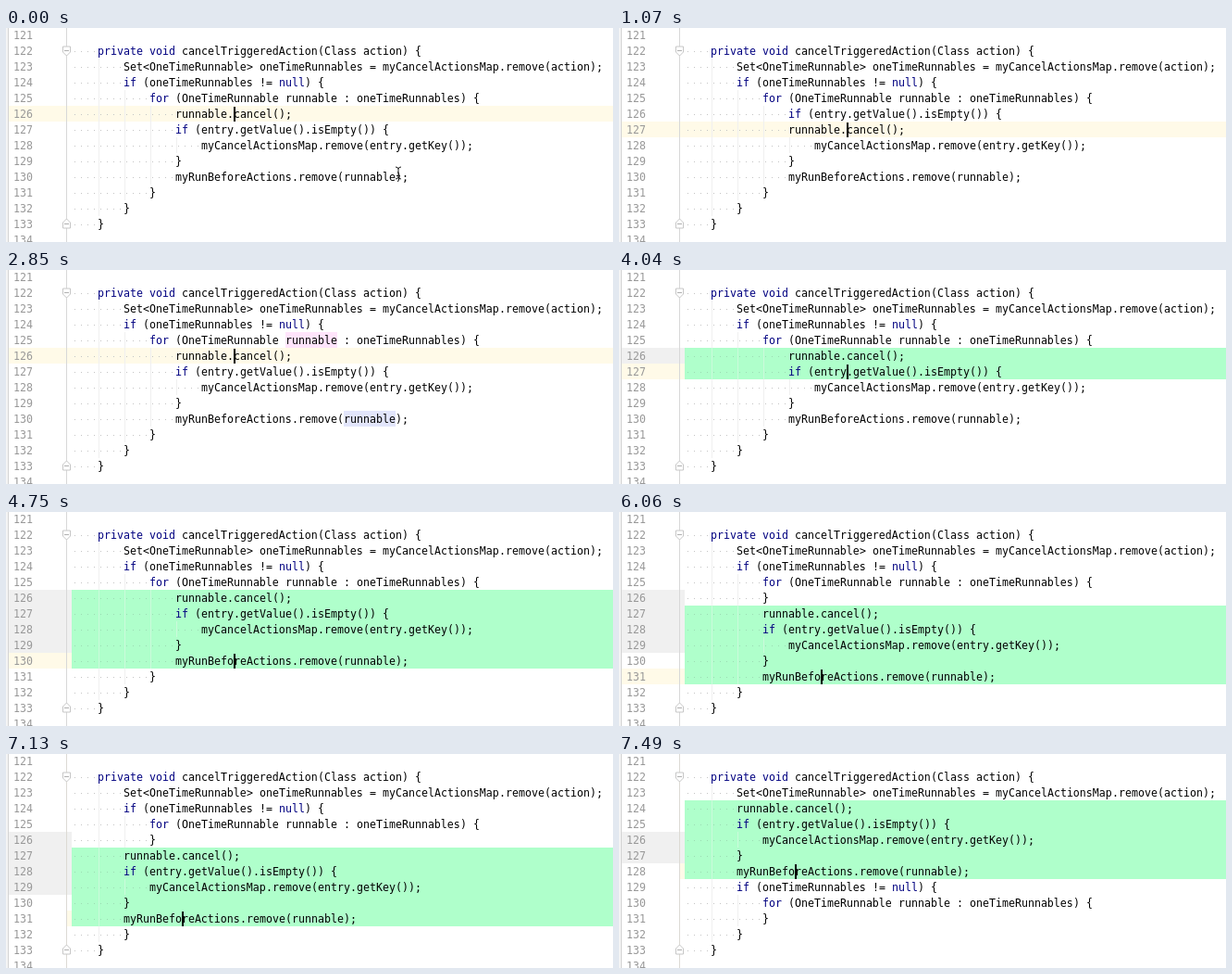
Animation of 656x231 px, one loop 8000 ms. Source, as an HTML page with a canvas:

```html
<!DOCTYPE html>
<html lang="en">
<head>
<meta charset="utf-8">
<title>Moving statements</title>
<style>
html, body { margin: 0; width: 100%; height: 100%; overflow: hidden; background: #fff; }
canvas { display: block; }
</style>
</head>
<body>
<canvas id="stage" width="656" height="231"></canvas>
<script>
const ctx = document.getElementById('stage').getContext('2d');
const LOOP = 8000, CHAR = 7, ROW = 17, LEFT = 71, FIRST = 122;
const CREAM = '#fffae8', GREEN = '#afffcb', GREY = '#f0f0f0';

// Lines are [indent level, text].
const head = [
  [1, 'private void cancelTriggeredAction(Class action) {'],
  [2, 'Set<OneTimeRunnable> oneTimeRunnables = myCancelActionsMap.remove(action);'],
  [2, 'if (oneTimeRunnables != null) {'],
  [3, 'for (OneTimeRunnable runnable : oneTimeRunnables) {']
];
const cancel = [0, 'runnable.cancel();'];
const cleanup = [
  [0, 'if (entry.getValue().isEmpty()) {'],
  [1, 'myCancelActionsMap.remove(entry.getKey());'],
  [0, '}'],
  [0, 'myRunBeforeActions.remove(runnable);']
];
const tail = [[3, '}'], [2, '}'], [1, '}']];
const indentBy = (lines, n) => lines.map(([level, text]) => [level + n, text]);

// "row" and "level" place the moving block; "selected" counts its green lines.
const steps = [
  [0, { row: 126, level: 4, caret: true, mouse: true, usages: false, selected: 0, staleGuide: false, gutter: true }],
  [240, { caret: false }],
  [840, { caret: true, mouse: false }],
  [960, { row: 127 }],
  [1300, { row: 128 }],
  [1660, { level: 5 }],
  [2370, { row: 127, usages: true }],
  [2490, { row: 126 }],
  [2850, { level: 4 }],
  [3440, { usages: false }],
  [3920, { selected: 1 }],
  [4030, { selected: 2 }],
  [4150, { selected: 3 }],
  [4390, { selected: 4 }],
  [4750, { selected: 5 }],
  [5230, { row: 127 }],
  [5590, { level: 3, staleGuide: true }],
  [6060, { staleGuide: false }],
  [6300, { row: 128 }],
  [6660, { level: 2 }],
  [7130, { row: 127, gutter: false }],
  [7250, { row: 126 }],
  [7370, { row: 125 }],
  [7490, { row: 124 }]
];

const stateAt = t => Object.assign({}, ...steps.filter(s => s[0] <= t).map(s => s[1]));
const rowTop = n => 84 + (n - 126) * ROW;
const indentX = level => LEFT + level * 4 * CHAR;

function rect(color, x, y, w, h) {
  ctx.fillStyle = color;
  ctx.fillRect(x, y, w, h);
}

function drawText(text, x, row, color) {
  for (const { 0: word, index } of text.matchAll(/\w+|[^\w\s]+/g)) {
    ctx.fillStyle = color || (/^(private|void|if|for|null)$/.test(word) ? '#000080' : '#000');
    ctx.fillText(word, x + index * CHAR, rowTop(row) + 13);
  }
}

function drawLine([level, text], row, green) {
  const top = rowTop(row);
  for (let k = 1; k < level; k++)
    rect(green ? '#cbfadb' : '#f0f0f0', indentX(k) + 1, top, 1, ROW);
  for (let i = 0; i < level * 4; i++)
    rect(green ? '#9bdcb2' : '#c4c4c4', LEFT + i * CHAR + 3, top + 9, 1, 1);
  drawText(text, indentX(level), row);
}

function drawFold(y, dir) {
  ctx.beginPath();
  ctx.moveTo(61.5, y - 4.5 * dir);
  ctx.lineTo(69.5, y - 4.5 * dir);
  ctx.lineTo(69.5, y + 1.5 * dir);
  ctx.lineTo(65.5, y + 5.5 * dir);
  ctx.lineTo(61.5, y + 1.5 * dir);
  ctx.closePath();
  ctx.fillStyle = '#fff';
  ctx.fill();
  ctx.strokeStyle = '#c6c6c6';
  ctx.stroke();
  rect('#b0b0b0', 63, Math.floor(y), 5, 1);
}

function drawMouse(x, y) {
  ctx.beginPath();
  ctx.moveTo(x - 3, y - 6.5);
  ctx.quadraticCurveTo(x, y - 6.5, x, y - 4);
  ctx.lineTo(x, y + 4);
  ctx.quadraticCurveTo(x, y + 6.5, x - 3, y + 6.5);
  ctx.moveTo(x + 3, y - 6.5);
  ctx.quadraticCurveTo(x, y - 6.5, x, y - 4);
  ctx.moveTo(x, y + 4);
  ctx.quadraticCurveTo(x, y + 6.5, x + 3, y + 6.5);
  ctx.moveTo(x - 2, y + 3);
  ctx.lineTo(x + 2, y + 3);
  ctx.strokeStyle = '#222';
  ctx.stroke();
}

function draw(t) {
  const s = stateAt(t);
  const moved = s.selected ? [cancel, ...cleanup] : [cancel];
  const lines = s.selected ? [...head, ...tail] : [...head, ...indentBy(cleanup, 4), ...tail];
  lines.splice(s.row - FIRST, 0, ...indentBy(moved, s.level));

  const caretRow = s.row + Math.max(s.selected - 1, 0);
  const isGreen = row => row >= s.row && row < s.row + s.selected;

  rect('#fff', 0, 0, 656, 231);
  rect('#f4f4f4', 0, 0, 2, 231);
  rect('#d4d4d4', 2, 0, 1, 231);
  if (s.selected)
    for (let row = 126; row <= Math.min(129, caretRow - 1); row++)
      rect(GREY, 3, rowTop(row), LEFT - 3, ROW);

  const creamX = s.gutter ? 3 : 65;
  rect(CREAM, creamX, rowTop(caretRow), 656 - creamX, ROW);
  rect(GREEN, LEFT, rowTop(s.row), 585, s.selected * ROW);
  if (s.usages) {
    rect('#ffe4fb', 302, rowTop(125), 56, ROW);
    rect('#e2e5fb', 365, rowTop(130), 56, ROW);
  }
  rect(s.gutter ? '#d8d8d8' : '#dcdad4', 65, 0, 1, 231);
  drawFold(24.5, 1);
  drawFold(211.5, -1);

  if (s.staleGuide) rect('#cbfadb', 156, 88, 2, 63);
  for (let n = 121; n <= 134; n++) drawText(String(n), 8, n, '#999');
  lines.forEach((line, i) => drawLine(line, FIRST + i, isGreen(FIRST + i)));

  // The caret keeps its column for one line and follows a shifted block.
  const caretX = s.selected ? indentX(s.level) + 9 * CHAR : 246;
  if (s.caret) rect('#000', caretX, rowTop(caretRow) + 1, 2, 16);
  if (s.mouse) drawMouse(424, 156.5);
}

ctx.font = `${CHAR / 0.602}px "DejaVu Sans Mono", monospace`;
const start = performance.now();
function tick() {
  draw((performance.now() - start) % LOOP);
  requestAnimationFrame(tick);
}
tick();
</script>
</body>
</html>
```
